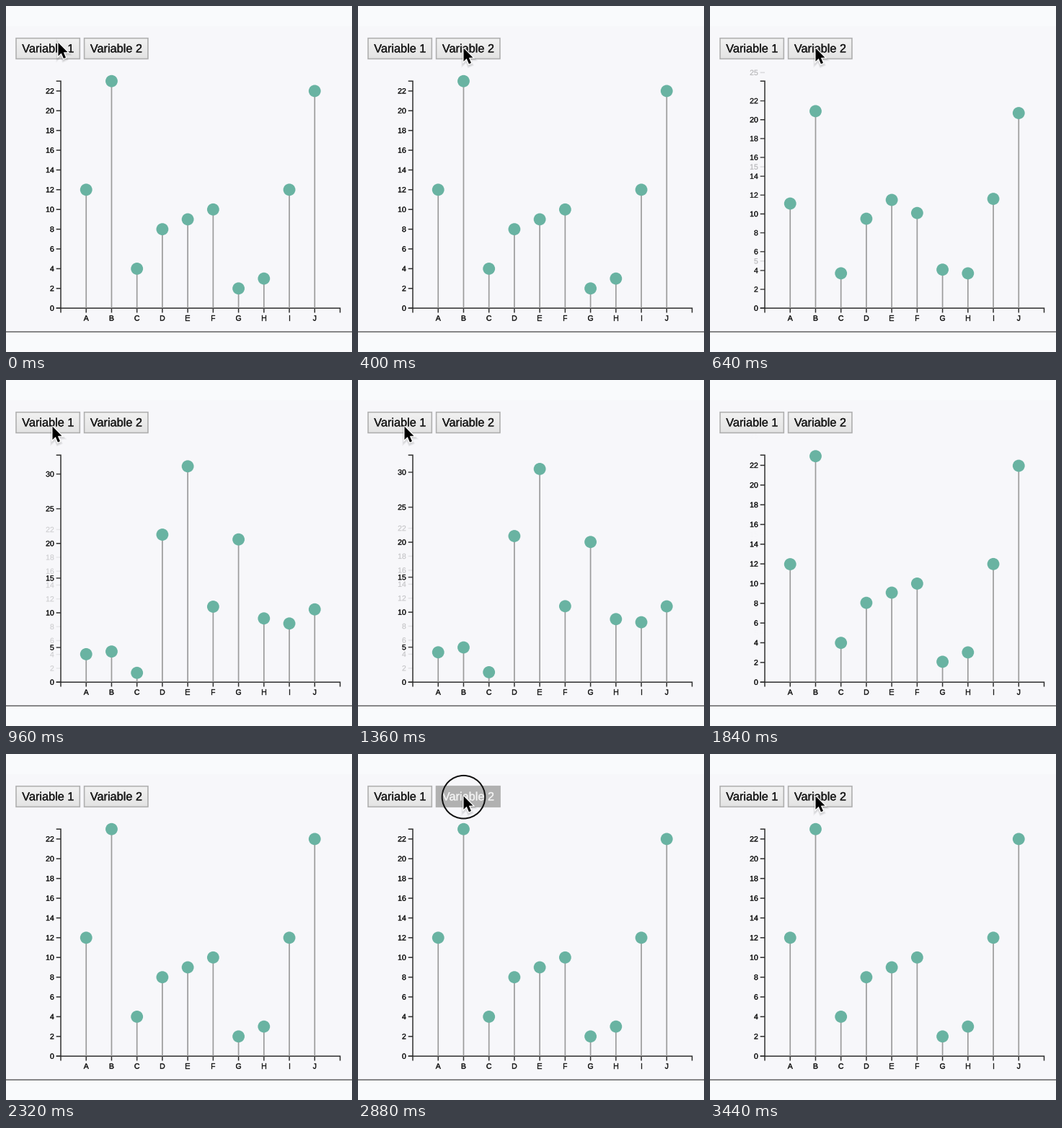
Animation of 480 by 480 pixels, one loop 3.52 s. Source, as a matplotlib script:

```python
import matplotlib.pyplot as plt
import numpy as np
from matplotlib.animation import FuncAnimation
from matplotlib.patches import Circle, Polygon, Rectangle
from matplotlib.patheffects import withStroke

SIZE, DPI = 480, 96
PT = 72 / DPI  # points per pixel
FRAMES, STEP = 44, 80

X0, Y0, WIDTH, HEIGHT = 76, 419.2, 387.5, 315
TICK, CLIP_TOP = 6.3, 76
GROUPS = "ABCDEFGHIJ"
VAR1 = np.array([12, 23, 4, 8, 9, 10, 2, 3, 12, 22])
VAR2 = np.array([3, 2, 1, 23, 34, 11, 23, 10, 8, 9])
TICKS1, TICKS2 = set(range(0, 23, 2)), set(range(0, 31, 5))

# Transition timing, pointer path and button presses, all in ms
DURATION, TO_VAR2, TO_VAR1 = 800, 378, 1126
PATH_T = [0, 200, 680, 880, 2480, 2720]
PATH_X = [72.5, 146.5, 146.5, 64.5, 64.5, 146.5]
PATH_Y = [51, 58.5, 58.5, 64.5, 64.5, 58.5]
HIDDEN = (1440, 2480)
PRESSES = [(240, 400, 1), (1040, 1200, 0), (2880, 3440, 1)]

INK, AXIS, DOT, STEM = "#1c1c1c", "#2e2e2e", "#69b3a2", "#9c9c9c"
ARROW = 1.08 * np.array([(0, 0), (0, 17), (3.9, 13.3), (6.9, 20.2),
                         (9.7, 19), (6.8, 12.3), (12, 12.1)])

plt.rcParams.update({"font.family": "Liberation Sans", "text.hinting": "none",
                     "toolbar": "None"})
fig = plt.figure(figsize=(SIZE / DPI, SIZE / DPI), dpi=DPI, facecolor="#f9fafc")
ax = fig.add_axes([0, 0, 1, 1])


def line(xs, ys, color=AXIS, width=1.5, z=2):
    return ax.plot(xs, ys, color=color, lw=width * PT, zorder=z, snap=False,
                   solid_capstyle="butt", solid_joinstyle="miter")[0]


def label(x, y, text, size, ha="center", color=INK, z=3):
    # A hairline outline gives the slightly heavier look of screen text.
    return ax.text(x, y, text, size=size * PT, ha=ha, va="baseline",
                   color=color, zorder=z,
                   path_effects=[withStroke(linewidth=0.3 * PT, foreground=color)])


def box(x, y, w, h, **style):
    return ax.add_patch(Rectangle((x, y), w, h, snap=False, **style))


def make_button(x, text):
    """Draw a button and return the artists of its pressed look."""
    y, w, h = 44.7, 88.3, 28.6
    shade = np.linspace(0.945, 0.89, 30)[:, None]
    ax.imshow(shade, cmap="gray", vmin=0, vmax=1, aspect="auto", zorder=4,
              extent=(x, x + w, y + h, y))
    box(x, y, w, h, fill=False, ec="#b0b0b0", lw=1.6 * PT, zorder=5)
    label(x + w / 2, 64.3, text, 16.3, color="#1a1a1a", z=6)
    cover = box(x, y, w, h, fc="#b1b1b1", ec="#b1b1b1", lw=1.4 * PT, zorder=7)
    return cover, label(x + w / 2, 64.3, text, 16.3, color="#f1f1f1", z=8)


box(0, 28, SIZE, 424, fc="#f7f7fa", ec="none", zorder=0)
line([0, SIZE], [452, 452], "#4a4a4a", 1.3)
pressed_looks = [make_button(14, "Variable 1"), make_button(108.6, "Variable 2")]

# Axes
top, left = Y0 - HEIGHT, X0 - TICK
line([left, X0, X0, left], [top, top, Y0, Y0])
line([X0, X0, X0 + WIDTH, X0 + WIDTH], [Y0 + TICK, Y0, Y0, Y0 + TICK])
xs = X0 + WIDTH / 11 * np.arange(1, 11)
for x, name in zip(xs, GROUPS):
    line([x, x], [Y0, Y0 + TICK])
    label(x, Y0 + 17.4, name, 10.5)
ticks = {v: (line([left, X0], [Y0, Y0]), label(X0 - 9.2, Y0, str(v), 10.5, "right"))
         for v in sorted(TICKS1 | TICKS2)}

# Lollipops
stems = [line([x, x], [Y0, Y0], STEM, 1.7) for x in xs]
dots = [ax.add_patch(Circle((x, Y0), 8.4, fc=DOT, ec="none", zorder=3)) for x in xs]

# Pointer with a soft shadow, and the click ring
ring = ax.add_patch(Circle((0, 0), 29.8, fill=False, ec="#111111",
                           lw=2 * PT, zorder=9))
pointer = [(ax.add_patch(Polygon(ARROW, fc=color, ec=color, alpha=alpha,
                                 lw=width * PT, zorder=z)), np.array([0, drop]))
           for color, alpha, width, drop, z in [("black", 0.05, 6, 2, 10),
                                                ("black", 0.07, 4, 2, 10),
                                                ("white", 1, 2.6, 0, 11),
                                                ("black", 1, 0, 0, 12)]]

ax.set(xlim=(0, SIZE), ylim=(SIZE, 0))
ax.axis("off")


def ease(t):
    t = min(max(t, 0), 1)
    return 4 * t**3 if t < 0.5 else 1 - 4 * (1 - t)**3


def progress(ms):
    if ms < TO_VAR1:
        return ease((ms - TO_VAR2) / DURATION)
    return 1 - ease((ms - TO_VAR1) / DURATION)


def update(frame):
    ms = frame * STEP
    p = progress(ms)
    scale1, scale2 = HEIGHT / VAR1.max(), HEIGHT / VAR2.max()

    for stem, dot, x, h in zip(stems, dots, xs,
                               (1 - p) * VAR1 * scale1 + p * VAR2 * scale2):
        stem.set_ydata([Y0, Y0 - h])
        dot.center = x, Y0 - h

    scale = (1 - p) * scale1 + p * scale2
    for value, (mark, text) in ticks.items():
        y = Y0 - value * scale
        alpha = (1 - p) * (value in TICKS1) + p * (value in TICKS2)
        mark.set_ydata([y, y])
        text.set_y(y + 3.6)
        for artist in (mark, text):
            artist.set_alpha(alpha)
            artist.set_visible(y > CLIP_TOP and alpha > 0)

    tip = np.array([np.interp(ms, PATH_T, PATH_X), np.interp(ms, PATH_T, PATH_Y)])
    for shape, offset in pointer:
        shape.set_xy(ARROW + tip + offset)
        shape.set_visible(not HIDDEN[0] <= ms < HIDDEN[1])

    down = [b for start, end, b in PRESSES if start <= ms < end]
    ring.center = tip + (0, 1.2)
    ring.set_visible(bool(down))
    for i, look in enumerate(pressed_looks):
        for artist in look:
            artist.set_visible(i in down)
    return []


anim = FuncAnimation(fig, update, frames=FRAMES, interval=STEP,
                     repeat=True, repeat_delay=0, blit=False)
plt.show()
```
